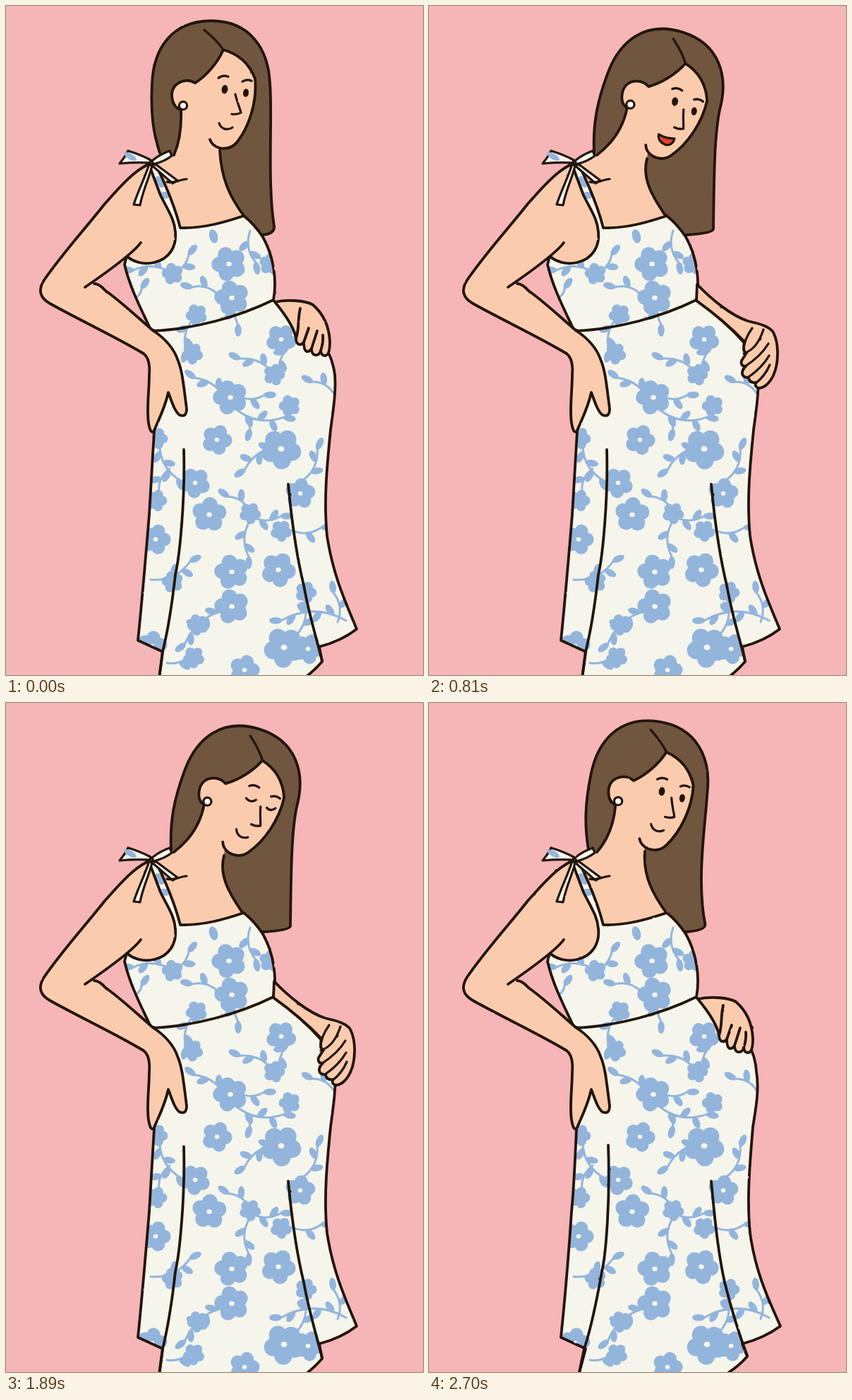
Recreate the animation shown at these times as an HTML page. Size 591 px wide and 947 px high, loop 2970 ms.

```html
<!DOCTYPE html>
<html lang="en">
<head>
<meta charset="utf-8">
<title>Expecting</title>
<style>
  html, body { margin: 0; width: 100%; height: 100%; overflow: hidden; background: #f6b5b7; }
  svg { display: block; width: 100%; height: 100%; }
  .line { fill: none; stroke: #22150a; stroke-width: 3.8; stroke-linecap: round; stroke-linejoin: round; }
  .thin { stroke-width: 3.2; }
</style>
</head>
<body>
<svg id="stage" viewBox="0 0 591 947"></svg>
<script>
const INK = '#22150a', SKIN = '#fbcbae', HAIR = '#70563f', CLOTH = '#f5f5ec', BLUE = '#93b5dc';
const STEP = 270, RAD = Math.PI / 180;

const fill = (d, color) => `<path d="${d}" fill="${color}"/>`;
const line = (d, cls = '') => `<path class="line ${cls}" d="${d}"/>`;
const shape = (d, color, cls) => fill(d, color) + line(d, cls);
const oval = (x, y, rx, ry, turn, color) =>
  `<ellipse rx="${rx}" ry="${ry}" fill="${color}" transform="translate(${x} ${y}) rotate(${turn})"/>`;

// Floral print: flowers by radius, sprigs as root, direction and length
function flower(x, y, r) {
  let out = oval(x, y, r * .45, r * .45, 0, BLUE);
  for (let i = 0; i < 5; i++) {
    const deg = i * 72 + x * 1.7, a = deg * RAD;
    out += oval(x + Math.cos(a) * r * .56, y + Math.sin(a) * r * .56, r * .47, r * .46, deg, BLUE);
  }
  return out + (r > 15 ? oval(x, y, r * .16, r * .14, 0, CLOTH) : '');
}

function sprig([x, y, deg, len]) {
  const dx = Math.cos(deg * RAD), dy = Math.sin(deg * RAD), bend = len * .14;
  const at = t => {
    const sag = 4 * bend * t * (1 - t);
    return [x + dx * len * t - dy * sag, y + dy * len * t + dx * sag];
  };
  let out = `<path d="M${x} ${y}Q${x + dx * len / 2 - dy * bend * 2} ${y + dy * len / 2 + dx * bend * 2} ${at(1).join(' ')}"
    fill="none" stroke="${BLUE}" stroke-width="3" stroke-linecap="round"/>`;
  const nodes = Math.round(len / 17);
  for (let i = 1; i <= nodes; i++) {
    const [lx, ly] = at(i / nodes), turn = deg + (i === nodes ? 0 : i % 2 ? 55 : -55);
    out += oval(lx + Math.cos(turn * RAD) * 8, ly + Math.sin(turn * RAD) * 8, 9, 4.8, turn, BLUE);
  }
  return out;
}

const flowers = {
  28: [[390, 627], [394, 908]],
  24: [[316, 365], [320, 413], [288, 720], [320, 801], [386, 798], [320, 850], [318, 554]],
  21: [[390, 472], [299, 614], [268, 675], [417, 690], [212, 755], [428, 910], [207, 906], [338, 940]],
  15: [[270, 437], [236, 379], [374, 365], [264, 492], [380, 522], [402, 566], [214, 612], [346, 718],
    [390, 743], [213, 700], [236, 815], [272, 876], [266, 922], [425, 830]]
};
const sprigs = [
  [236, 379, -50, 36], [236, 379, 185, 56], [182, 414, -55, 18], [300, 408, 195, 38], [346, 318, 80, 46],
  [268, 440, 105, 50], [329, 415, 90, 36], [312, 560, 217, 56], [380, 522, 205, 54], [408, 478, 118, 46],
  [330, 552, -2, 36], [325, 570, 10, 70], [350, 584, 105, 16], [390, 623, 147, 62], [464, 548, 208, 34],
  [218, 615, 65, 60], [232, 655, 115, 36], [420, 672, -65, 50], [346, 716, 215, 38], [346, 722, 0, 44],
  [346, 728, 92, 52], [405, 742, -5, 42], [205, 812, -25, 62], [315, 855, 142, 78], [482, 870, 180, 92],
  [412, 890, -78, 50], [470, 872, -98, 42], [228, 930, -20, 36]
];
const print = sprigs.map(sprig).join('') +
  Object.entries(flowers).map(([r, spots]) => spots.map(([x, y]) => flower(x, y, +r)).join('')).join('') +
  oval(294, 326, 10, 6, 75, BLUE) + oval(218, 249, 9, 5, 60, BLUE) + oval(225, 268, 8, 5, 0, BLUE);

// Body; k runs from 0 to 1 between the two redrawn outlines
const bodice = `M204 228L219 268C230 290 239 302 240 320C242 340 232 358 210 363C195 367 180 362 171 354L168 366
  C176 400 192 430 206 460C265 458 330 440 379 416C384 390 380 355 364 327Q352 309 337 297
  C310 306 280 315 247 314Q237 275 213 226Z`;
const skirt = k => `M209 459L215 500L213 580L${210 - k} 602C207 650 205 690 ${203 - k} 720C198 780 192 850 187 898
  L222 914L${217 - 5 * k} 952H${422 - 4 * k}Q438 940 ${448 + 3 * k} ${928 - 3 * k}L444 907Q475 899 ${497 + k} 882
  C485 852 ${464 - k} 810 455 750C450 700 455 650 ${460 - k} 600C464 570 468 545 ${466 - 2 * k} 522
  Q462 492 447 477C425 452 400 432 379 417`;
const folds = k => `M${252 + 2 * k} ${628 - 2 * k}C${254 + 3 * k} 700 ${246 + 5 * k} 780 ${240 + 5 * k} 805
  C${235 + 2 * k} 850 228 890 ${222 - 2 * k} 914L${217 - 5 * k} 952
  M400 677C404 720 ${411 - 2 * k} 775 ${422 - 3 * k} 820C429 860 440 895 ${448 + 3 * k} ${927 - 3 * k}`;

const armEdge = `M200 225C178 236 160 258 140 280C115 312 80 350 54 388C45 402 48 413 62 421C105 445 155 468 195 492
  C203 498 204 510 203 522C203 545 199 570 202 590Q205 608 210 601C216 586 225 570 230 547C235 560 239 574 246 579
  Q256 583 256 570C252 540 250 515 243 500C238 485 225 470 209 460C190 444 165 420 141 403Q132 393 125 393`;
const arm = fill(armEdge + 'L112 398C150 372 180 350 191 335Z', SKIN) + line(armEdge) +
  line('M191 335C180 350 150 372 112 398');

const bow =
  shape('M203 224C196 245 188 260 181 281L190 282C194 260 203 244 207 226Z', CLOTH, 'thin') +
  shape('M206 225L236 251L243 247L212 224Z', CLOTH, 'thin') +
  shape('M204 222Q182 221 161 223Q168 215 173 205Q190 210 205 218Z', CLOTH, 'thin') +
  oval(176, 213, 10, 4, 30, BLUE) +
  shape('M207 219Q218 210 232 205L235 212Q225 220 209 224Z', CLOTH, 'thin') +
  line('M228 249C236 252 245 246 256 245M198 222L212 225', 'thin');

const handHigh =
  shape(`M381 419C400 415 425 417 435 423C450 436 458 455 459 475Q459 495 452 495Q447 495 446 488
    Q444 495 438 494Q433 493 433 485Q430 490 426 489Q422 487 422 476Q419 480 415 479Q411 477 411 470
    C408 455 396 437 381 419Z`, SKIN) +
  line('M417 428C413 445 416 456 411 471M422 476L429 456M433 485L441 460M446 488Q450 476 449 466');
const handLow =
  shape(`M380 394C400 415 428 438 452 446C470 450 483 454 488 462C497 480 495 508 488 523
    C482 535 474 541 467 541Q461 539 463 533Q454 534 453 526Q443 526 444 518Q445 513 449 510
    Q441 510 443 502L450 491Q444 490 447 475C425 452 400 432 379 417Z`, SKIN) +
  line('M458 456C450 467 446 478 446 488M474 458C468 476 460 487 446 492M481 478Q470 496 448 510M482 495Q472 512 453 525M483 508Q476 524 463 534', 'thin');

// The head turns about the base of the neck; hair ends and neck stay on the body
function head(tilt, mood) {
  const c = Math.cos(tilt * 8.75 * RAD), s = Math.sin(tilt * 8.75 * RAD), px = 273, py = 252;
  const turn = d => d.replace(/([\d.]+)\s+([\d.]+)/g, (_, x, y) =>
    `${(px + (x - px) * c - (y - py) * s).toFixed(1)} ${(py + (x - px) * s + (y - py) * c).toFixed(1)}`);
  const t = tilt;

  const hair = `M${218 + 8 * t} 208C${208 + 12 * t} ${178 - 6 * t} ` +
    turn('205 150 207 110C209 60 235 21 291 21C345 21 372 60 374 110C378 150 ') +
    `${370 + 8.5 * t * t} 250 ${380 + 11.5 * t} ${312 + 2 * t}Q${381 + 10 * t} 322 364 324`;
  const face = turn(`M289 189Q292 198 303 201C313 203 321 201 328 192C345 170 356 135 353 103C345 82 330 68 308 62
    C300 80 285 98 268 109C255 101 237 108 235 124Q235 143 248 147`) +
    `C${249 + 13 * t} 173 ${245 + 7 * t} 195 238 211`;
  const neck = `M${338 - t} 298C318 272 ${305 - 2 * t} 245 ${303 + 3 * t} ${204 + 6 * t}`;

  const eye = (x, y) => turn(`${x} ${y}`).split(' ');
  const eyes = mood === 'shut'
    ? line(turn('M302 120Q310 125 316 118M334 124Q341 128 346 121'), 'thin')
    : oval(...eye(310, 118), 4.4, 6.2, 8, INK) + oval(...eye(340, 123), 4, 5.8, 8, INK);
  const mouth = mood === 'laugh'
    ? shape(turn('M302 169Q314 172 325 168C326 176 320 181 314 180C306 179 302 174 302 169Z'), '#e4412f', 'thin')
    : line(turn('M302 166C305 174 313 177 321 172'), 'thin');
  const [ex, ey] = eye(251, 141);

  return shape(hair, HAIR) +
    fill(`${neck}L${turn('289 169')}L240 208L200 226L188 336L172 356L215 366L246 340Z`, SKIN) +
    line(neck) + shape(face, SKIN) + eyes + mouth +
    line(turn('M308 62C300 50 291 42 281 34'), 'thin') +
    line(turn('M301 102Q307 97 315 100M335 107Q341 103 348 106M325 125C328 138 332 146 333 151Q328 154 320 153'), 'thin') +
    `<circle class="line thin" cx="${ex}" cy="${ey}" r="5.6" style="fill:#fffdf5"/>`;
}

const pencil = seed =>
  `<filter id="pencil" filterUnits="userSpaceOnUse" x="0" y="0" width="591" height="960" color-interpolation-filters="sRGB">
    <feTurbulence type="fractalNoise" baseFrequency=".09" numOctaves="2" seed="${seed}"/>
    <feDisplacementMap in="SourceGraphic" scale="1.6" xChannelSelector="R" yChannelSelector="G"/></filter>`;

// Each step: outline, head tilt, mood
const steps = [
  [0, 0], [.5, 0], [1, 1], [0, 2, 'laugh'], [.5, 2, 'laugh'], [0, 2],
  [1, 2], [0, 2, 'shut'], [.5, 2, 'shut'], [0, 2], [1, 1]
];

function scene([k, tilt, mood]) {
  const body = skirt(k);
  return `<defs>${pencil(3 + k * 4)}
      <clipPath id="dress"><path d="${body}"/><path d="${bodice}"/></clipPath></defs>
    <rect width="591" height="947" fill="#f6b5b7"/>
    <g filter="url(#pencil)">${head(tilt, mood)}${fill(body, CLOTH)}${fill(bodice, CLOTH)}</g>
    <g clip-path="url(#dress)">${print}</g>
    <g filter="url(#pencil)">${line(body)}${line(bodice)}${line(folds(k))}${arm}${tilt < 2 ? handHigh : handLow}${bow}</g>`;
}

const stage = document.getElementById('stage');
const scenes = steps.map(scene);
let shown = -1;
function tick() {
  const now = Math.floor(performance.now() / STEP) % steps.length;
  if (now !== shown) stage.innerHTML = scenes[shown = now];
  requestAnimationFrame(tick);
}
tick();
</script>
</body>
</html>
```
